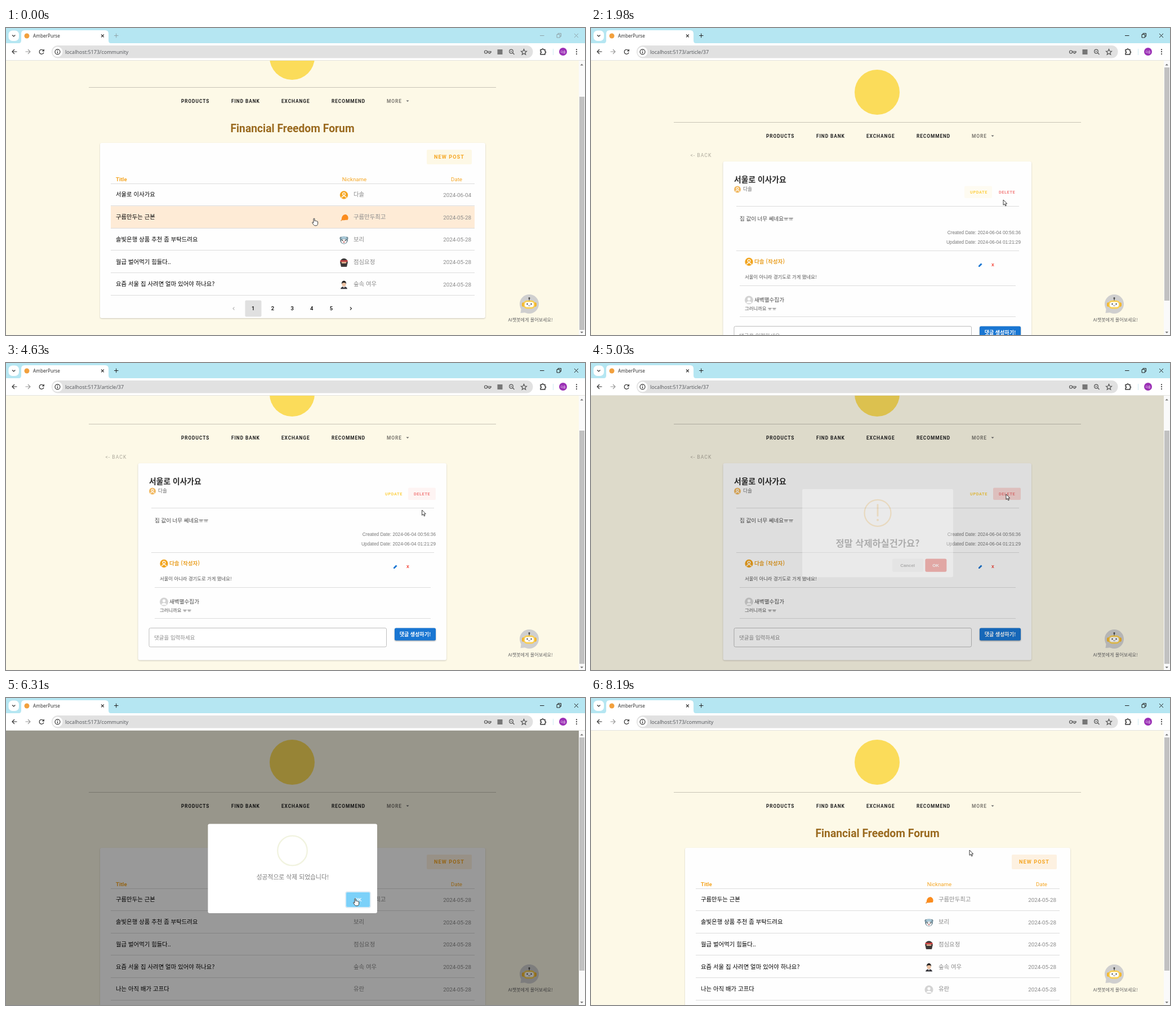
These frames come from a looping animation (1028x545 px, 8.87 s). An HTML page:

```html
<!DOCTYPE html>
<html lang="ko">
<head>
<meta charset="utf-8">
<title>Community board</title>
<style>
html, body { margin: 0; width: 100%; height: 100%; overflow: hidden; background: #fdf9e7; }
svg { display: block; }
/* every label is placed by its vertical centre */
text { font: 10.4px "Noto Sans CJK KR", sans-serif; transform: translateY(.36em); white-space: pre; }
.ro { font-family: Roboto, sans-serif; }
.ui { font-family: "Noto Sans", sans-serif; font-size: 9px; fill: #5a5d61; }
.b { font-weight: 700; }
.mid { text-anchor: middle; }
.end { text-anchor: end; }
.nav { font-size: 8.4px; font-weight: 600; letter-spacing: .9px; fill: #222; }
.gold { fill: #f5a623; }
.grey { fill: #8a8a8a; }
.small { font-size: 8.4px; fill: #555; }
.date { font: 8.25px "Liberation Sans", sans-serif; fill: #777; }
.act { font-size: 7.3px; font-weight: 700; letter-spacing: .6px; }
.btn { font: 700 8.8px "Liberation Sans", sans-serif; fill: #fff; text-anchor: middle; }
.line { stroke: #dcdcdc; }
.icon { fill: none; stroke: #333; stroke-width: 1.2; }
.card { fill: #fefefe; filter: drop-shadow(0 1px 1px #0003); }

/* one shared 8.87 s clock; 1% = 88.7 ms */
.t { animation: 8.87s step-end infinite; }
#listA { --post: #fdf8e6; translate: 0 -62px; animation-name: early; }
#listB { --post: #fdf1e1; animation-name: late; }
#article { animation-name: article, scroll; }
#faces { animation-name: faces; }
#hover { animation-name: hover; }
#glance { animation-name: glance; }
#press { animation-name: press; }
#boardUrl { animation-name: board; }
#articleUrl { animation-name: article; }
#winbtn { animation-name: focus; }
#thumb { animation-name: thumb; }
#dim { animation-name: dim; }
#modal { transform-origin: 509px 302px; animation-name: modal; }
#ask { animation-name: ask; }
#done { animation-name: late; }
#tick { stroke-dasharray: 1 2; animation-name: tick; }
#cursor { animation-name: cursor; }
#hand { animation-name: hand; }
#arrow { animation-name: arrow; }

@keyframes early { 0% { visibility: visible } 13.52%, 100% { visibility: hidden } }
@keyframes late { 0% { visibility: hidden } 70%, 100% { visibility: visible } }
@keyframes board { 0%, 70%, 100% { visibility: visible } 13.52% { visibility: hidden } }
@keyframes article { 0%, 70%, 100% { visibility: hidden } 13.52% { visibility: visible } }
@keyframes ask { 0%, 70%, 100% { visibility: hidden } 55.58% { visibility: visible } }
@keyframes faces { 0% { visibility: hidden } 73.39%, 100% { visibility: visible } }
@keyframes focus { 0% { stroke: #8fa3a8 } 13.52%, 100% { stroke: #222 } }
@keyframes hover { 0% { translate: 0 39.8px } 6.76%, 100% { translate: 0 0 } }
@keyframes glance { 0%, 27.95%, 100% { fill-opacity: 0 } 20.06% { fill-opacity: .06 } }
@keyframes press { 0% { fill-opacity: 0 } 23.44% { fill-opacity: .05 } 55.58%, 100% { fill-opacity: .19 } }
@keyframes scroll {
  0%, 27.95% { translate: 0 0; animation-timing-function: steps(8, start) }
  36.84%, 100% { translate: 0 -59px }
}
@keyframes thumb {
  0% { translate: 0 122px }
  13.52% { translate: 0 70px }
  27.95% { translate: 0 70px; animation-timing-function: steps(8, start) }
  36.84% { translate: 0 120px }
  70%, 100% { translate: 0 70px }
}
@keyframes dim {
  0% { opacity: 0 }
  55.58% { opacity: .04 }
  56.7% { opacity: .127 }
  57.83% { opacity: .29 }
  58.96% { opacity: .4 }
  82.41% { opacity: .27 }
  83.53% { opacity: .127 }
  84.66% { opacity: .03 }
  85.79%, 100% { opacity: 0 }
}
@keyframes modal {
  0% { opacity: 0; scale: .5 }
  55.58% { opacity: .06; scale: .6 }
  56.7% { opacity: .37; scale: .893 }
  57.83% { opacity: .85; scale: 1.03 }
  58.96% { opacity: 1; scale: 1 }
  82.41% { opacity: .5; scale: 1 }
  83.53% { opacity: .06; scale: .96 }
  84.66%, 100% { opacity: 0; scale: .9 }
}
@keyframes tick {
  0%, 83.53%, 100% { stroke-dashoffset: 1.01 }
  74.52% { stroke-dashoffset: 1.01; animation-timing-function: steps(6, start) }
  81.28% { stroke-dashoffset: 0 }
}
@keyframes cursor {
  0% { translate: 547px 338px }
  4.5% { translate: 547px 338px; animation-timing-function: steps(4, start) }
  9.01% { translate: 437px 297px }
  10.14% { translate: 437px 297px; animation-timing-function: steps(2, start) }
  12.4% { translate: 382px 293px }
  13.52% { translate: 382px 293px; animation-timing-function: steps(7, start) }
  21.15% { translate: 682px 306px }
  22.32% { translate: 732px 305px }
  23.44% { translate: 732px 305px; animation-timing-function: steps(3, start) }
  26.83% { translate: 748px 284px }
  27.95% { translate: 748px 284px; animation-timing-function: steps(8, start) }
  36.84% { translate: 743px 232px }
  44.75% { translate: 743px 232px; animation-timing-function: steps(4, start) }
  49.04% { translate: 735px 303px; animation-timing-function: steps(5, start) }
  54.39% { translate: 741px 233px }
  55.58% { translate: 737px 233px }
  58.96% { translate: 737px 233px; animation-timing-function: steps(6, start) }
  65.61% { translate: 622px 361px }
  68.88% { translate: 620px 356px }
  73.39% { translate: 620px 356px; animation-timing-function: steps(5, start) }
  79.02% { translate: 616px 353px }
  88.04% { translate: 616px 353px; animation-timing-function: steps(5, start) }
  93.4%, 100% { translate: 672px 270px }
}
@keyframes hand {
  0%, 23.44%, 53.32%, 64.48% { visibility: visible }
  13.52%, 44.75%, 55.58%, 88.04%, 100% { visibility: hidden }
}
@keyframes arrow {
  0%, 23.44%, 53.32%, 64.48% { visibility: hidden }
  13.52%, 44.75%, 55.58%, 88.04%, 100% { visibility: visible }
}
</style>
</head>
<body>
<svg width="1028" height="545" viewBox="0 0 1028 545">
<defs>
  <g id="person">
    <circle r="7.2" fill="currentColor"/>
    <circle cy="-1.8" r="2.3" fill="none" stroke="#fff" stroke-width="1.3"/>
    <path d="M-4 5C-3.4 .8 3.4 .8 4 5" fill="none" stroke="#fff" stroke-width="1.3"/>
  </g>
  <g id="blank">
    <circle r="7.5" fill="#d3d3d3"/>
    <circle cy="-1.8" r="2.6" fill="#fff"/>
    <path d="M-4.8 5.4C-4 .8 4 .8 4.8 5.4Z" fill="#fff"/>
  </g>
  <g id="nugget">
    <path d="M-3 3.5L-5.5 6" stroke="#e9a35e" stroke-width="1.8"/>
    <path d="M-4 4.5C-5-2 0-6.5 4-5C8-3 8.5 2 6.5 4.5C3 4-1 6-4 4.5Z" fill="#fb8c1e"/>
  </g>
  <g id="bear">
    <circle cx="-5" cy="-3" r="2.6" fill="#78909c"/><circle cx="5" cy="-3" r="2.6" fill="#78909c"/>
    <circle r="6.8" cy=".5" fill="#607d8b"/>
    <ellipse cy="2.5" rx="5" ry="4" fill="#f4f4f4"/>
    <path d="M-6-1.5C-4-8 4-8 6-1.5Z" fill="#a9c9d8"/>
    <circle cx="-2.5" cy="1" r=".9"/><circle cx="2.5" cy="1" r=".9"/>
    <ellipse cy="4" rx="1.5" ry="1.1" fill="#c66"/>
  </g>
  <g id="ninja">
    <path d="M-5 8L-6 4H6L5 8Z" fill="#464040"/>
    <circle r="6.8" fill="#3a3636"/>
    <rect x="-6.5" y="-3.5" width="13" height="2.4" fill="#d84343"/>
    <rect x="-4.5" y="-.8" width="9" height="2.8" rx="1.4" fill="#d9a98a"/>
  </g>
  <g id="man">
    <path d="M-6 7.5C-5 2 5 2 6 7.5Z" fill="#37373d"/>
    <ellipse cy="-1" rx="3.5" ry="4.3" fill="#eec3a4"/>
    <path d="M-4-1C-5-9 5-9 4-1L2.8-3.5H-2.5Z" fill="#222"/>
    <path d="M-1.5 3L0 6L1.5 3Z" fill="#fff"/>
  </g>

  <g id="head">
    <circle cx="508" cy="114" r="40" fill="#fbdc5a"/>
    <path d="M147 167.5H870" stroke="#c8c4b6"/>
    <text class="ro nav" x="311" y="192">PRODUCTS</text>
    <text class="ro nav" x="400" y="192">FIND BANK</text>
    <text class="ro nav" x="489" y="192">EXCHANGE</text>
    <text class="ro nav" x="578" y="192">RECOMMEND</text>
    <text class="ro nav" x="676" y="192" style="fill:#7d7a72">MORE</text>
    <path d="M710.5 190.5H715.5L713 193Z" fill="#666"/>
  </g>

  <g id="board">
    <use href="#head"/>
    <text class="ro b mid" x="508.5" y="240" style="font-size:19.3px" fill="#9a6a1f">Financial Freedom Forum</text>
    <rect class="card" x="167" y="266" width="684" height="311" rx="3"/>
    <rect x="747" y="278" width="80" height="26" rx="2" fill="var(--post)"/>
    <text class="ro b gold" x="760" y="291" style="font-size:9.2px;letter-spacing:1.05px">NEW POST</text>
    <g id="pages"></g>
    <text class="ro b gold" x="195" y="330.5" style="font-size:9.7px">Title</text>
    <text class="ro gold mid" x="618.5" y="330.5" style="font-size:9.7px">Nickname</text>
    <text class="ro gold mid" x="800" y="330.5" style="font-size:9.7px">Date</text>
  </g>
</defs>

<rect width="1028" height="545" fill="#fdf9e7"/>

<g id="listA" class="t">
  <use href="#board"/>
  <rect id="hover" class="t" x="186" y="338.5" width="646" height="39.8" fill="#feebd6"/>
  <g id="rowsA"></g>
</g>

<g id="listB" class="t">
  <use href="#board"/>
  <g id="rowsB"></g>
  <g id="faces" class="t"></g>
</g>

<g id="article" class="t">
  <use href="#head"/>
  <text class="ro" x="176.5" y="226" style="font-size:8.6px;letter-spacing:1px" fill="#aca89b">&lt;- BACK</text>
  <rect class="card" x="234.5" y="237" width="547.5" height="349.5" rx="3"/>
  <text class="b" x="254" y="269" style="font-size:13.8px" fill="#2a2a2a">서울로 이사가요</text>
  <use href="#person" transform="translate(260 286.5) scale(.83)" color="#f1b860"/>
  <text x="270" y="286" style="font-size:8.7px" fill="#666">다솔</text>
  <rect id="glance" class="t" x="663" y="280.5" width="49" height="21.5" rx="2" fill="#fbc02d"/>
  <text class="ro act" x="673" y="291.5" fill="#fdd044">UPDATE</text>
  <rect id="press" class="t" x="714" y="280.5" width="49" height="21.5" rx="2" fill="#f44336"/>
  <text class="ro act" x="724" y="291.5" fill="#f28080">DELETE</text>
  <path class="line" d="M258 316.5H760M258 395.5H760M264 457.5H754M264 512.5H754"/>
  <text x="264" y="339" style="font-size:9.5px" fill="#444">집 값이 너무 쎄네요ㅠㅠ</text>
  <text class="date end" x="763" y="363.5">Created Date: 2024-06-04 00:56:36</text>
  <text class="date end" x="763" y="380.5">Updated Date: 2024-06-04 01:21:29</text>
  <use href="#person" x="280.5" y="415" color="#f2a51f"/>
  <text class="b" x="290" y="415" style="font-size:9.6px" fill="#eaa32b">다솔 (작성자)</text>
  <text class="small" x="273" y="442">서울이 아니라 경기도로 가게 됐네요!</text>
  <path d="M688 424V422L692.5 417.5L694.5 419.5L690 424Z" fill="#1976d2"/>
  <text class="ro b mid" x="713.5" y="420.5" style="font-size:7.5px" fill="#f44336">X</text>
  <use href="#blank" x="280.5" y="483"/>
  <text x="290" y="483" style="font-size:9.6px" fill="#444">새벽별수집가</text>
  <text class="small" x="273" y="497.5">그러니까요 ㅠㅠ</text>
  <rect x="254" y="529.5" width="421.5" height="33.5" rx="2.5" fill="#fff" stroke="#bdbdbd"/>
  <text x="263" y="547" style="font-size:9.5px" fill="#8c8c8c">댓글을 입력하세요</text>
  <rect x="690" y="529.5" width="73" height="22" rx="2.5" fill="#1976d2" style="filter:drop-shadow(0 1px 1px #0006)"/>
  <text class="b mid" x="726.5" y="540.5" style="font-size:9px" fill="#fff">댓글 생성하기!</text>
</g>

<g id="chat">
  <path d="M915 496L913.5 506L924 505Z" fill="#cfcfcf"/>
  <circle cx="929" cy="490" r="17" fill="#cfcfcf"/>
  <path d="M929 484V480" stroke="#555" stroke-width="1.5"/><circle cx="929" cy="479.5" r="1.5" fill="#444"/>
  <rect x="916" y="487" width="26" height="8" rx="3" fill="#f3b62c"/>
  <rect x="919" y="483.5" width="20" height="15" rx="6" fill="#f9cf55"/>
  <rect x="921" y="486.5" width="16" height="9" rx="4" fill="#fff"/>
  <circle cx="925.5" cy="490" r="1.2" fill="#444"/><circle cx="932.5" cy="490" r="1.2" fill="#444"/>
  <path d="M927 492.5Q929 494 931 492.5" fill="none" stroke="#666" stroke-width=".8"/>
  <text class="mid" x="931" y="518.5" style="font-size:8.1px" fill="#666">AI챗봇에게 물어보세요!</text>
</g>

<rect id="dim" class="t" y="58" width="1017" height="487"/>

<g id="modal" class="t">
  <g id="ask" class="t">
    <rect x="359" y="214.5" width="300" height="175" rx="3" fill="#fff"/>
    <g fill="#f8d08c">
      <circle cx="509" cy="262" r="26.3" fill="none" stroke="#f8d08c" stroke-width="2.5"/>
      <rect x="507.4" y="244" width="3.2" height="25" rx="1.5"/><circle cx="509" cy="276" r="2.3"/>
    </g>
    <text class="b mid" x="509" y="322" style="font-size:18.4px" fill="#000" fill-opacity=".65">정말 삭제하실건가요?</text>
    <rect x="538" y="353" width="62" height="26" rx="3" fill="#efefef"/>
    <text class="btn" x="568.5" y="366" style="fill:#555">Cancel</text>
    <rect x="603.5" y="353" width="42.5" height="26" rx="3" fill="#e64942"/>
    <text class="btn" x="624.5" y="366">OK</text>
  </g>
  <g id="done" class="t">
    <rect x="358.5" y="223.5" width="300.5" height="158.5" rx="3" fill="#fff"/>
    <circle cx="508.5" cy="271" r="26.3" fill="none" stroke="#f1f3df" stroke-width="2.3"/>
    <path id="tick" class="t" pathLength="1" d="M493.5 271L505.5 283L525.5 260" fill="none" stroke="#a5dc86" stroke-width="3"/>
    <text class="mid" x="509" y="318" style="font-size:10.8px" fill="#7d7d7d">성공적으로 삭제 되었습니다!</text>
    <rect x="602.5" y="343.5" width="45" height="29" rx="4" fill="#c2d6e4"/>
    <rect x="603.5" y="344.5" width="43" height="27" rx="3" fill="#7cd1f9" stroke="#fff" stroke-width=".7"/>
    <text class="btn" x="625" y="358">OK</text>
  </g>
</g>

<g id="scrollbar">
  <rect x="1017" y="58" width="11" height="487" fill="#fafafa"/>
  <rect id="thumb" class="t" x="1018" width="9" height="414" fill="#c1c1c1"/>
  <path d="M1019.5 66.5H1025L1022.3 63.5ZM1019.5 539H1025L1022.3 542Z" fill="#777"/>
</g>

<g id="browser">
  <rect width="1028" height="27" fill="#b5e6f2"/>
  <rect x="4.5" y="4.5" width="18.5" height="18.5" rx="7" fill="#fff"/>
  <path class="icon" d="M11 12.5L13.7 15L16.4 12.5"/>
  <path d="M23 27Q27 27 27 22V10Q27 4 33 4H176Q182 4 182 10V22Q182 27 186 27Z" fill="#fff"/>
  <circle cx="37" cy="14" r="4.5" fill="#f2a03d"/>
  <text class="ui" x="48" y="14.5" style="font-size:8.2px;fill:#333">AmberPurse</text>
  <path class="icon" d="M169 11.5L173.8 16.3M173.8 11.5L169 16.3"/>
  <path id="winbtn" class="t" fill="none" d="M192 13.5H199.5M195.7 9.7V17.3M948 13.5H955.5M978 11.5H983.5V17H978ZM980 11V9.5H985.5V15H984M1009 10L1016 17M1016 10L1009 17"/>
  <rect y="27" width="1028" height="31" fill="#fff"/>
  <path d="M0 57.5H1028" stroke="#e3e3df"/>
  <path class="icon" d="M19.5 42H11M15 38L11 42L15 46"/>
  <path class="icon" style="stroke:#9a9a9a" d="M34.5 42H43M39 38L43 42L39 46"/>
  <path class="icon" d="M66.5 40A4 4 0 1 0 67 43.5M67.3 37.8V40.8H64.3"/>
  <rect x="81" y="31" width="854.5" height="22.5" rx="11.2" fill="#e1e1e1"/>
  <circle cx="91.5" cy="42.3" r="9" fill="#fff"/>
  <circle class="icon" cx="91.5" cy="42.3" r="4.5"/>
  <path class="icon" d="M91.5 41.8V45M91.5 39.5V40.7"/>
  <text id="boardUrl" class="ui t" x="105" y="42.5">localhost:5173/community</text>
  <text id="articleUrl" class="ui t" x="105" y="42.5">localhost:5173/article/37</text>
  <g class="icon" style="stroke:#555">
    <circle cx="852" cy="42.5" r="2.5"/><path d="M854.5 41.5H861V43.5H859.5V45H857.5V43.5H854.5"/>
    <circle cx="897" cy="41.5" r="3.3"/><path d="M899.5 44L902.5 47M895.5 41.5H898.5"/>
    <path d="M919.5 37.5L921 41L924.5 41.3L921.8 43.7L922.7 47.3L919.5 45.3L916.3 47.3L917.2 43.7L914.5 41.3L918 41Z"/>
  </g>
  <rect x="872.5" y="38" width="9" height="9" fill="#777"/>
  <path class="icon" style="stroke-width:1.4" d="M949 38.5H951.5A1.5 1.5 0 0 1 954.5 38.5H957V41.5A1.5 1.5 0 0 1 957 44.5V47H949V44.5A1.5 1.5 0 0 0 949 41.5Z"/>
  <path d="M971.5 37V48" stroke="#cdeaf2"/>
  <circle cx="989" cy="42" r="7" fill="#9b30b5"/>
  <text class="mid" x="989" y="42" style="font-size:5px" fill="#fff">다솔</text>
  <g fill="#333"><circle cx="1013" cy="38.3" r="1.1"/><circle cx="1013" cy="42.2" r="1.1"/><circle cx="1013" cy="46.1" r="1.1"/></g>
</g>

<g id="cursor" class="t" fill="#fff" stroke="#222" stroke-width=".9" stroke-linejoin="round">
  <path id="arrow" class="t" d="M0 0V9.3L2.2 7.4L3.8 10.9L5.3 10.2L3.8 6.9H6.7Z"/>
  <path id="hand" class="t" d="M-1 .9C-1-.3 1-.3 1 .9V4.5C1.2 3.8 2.8 3.8 3 4.9C3.4 4.2 4.9 4.4 5 5.4C5.5 4.9 6.6 5.2 6.6 6.2V9.2C6.6 11 5.6 12.8 3.6 12.8H1.6C.2 12.8-.6 11.8-1.3 10.7L-3.2 7.8C-3.6 7-2.6 6.2-1.9 6.9L-1 7.8Z"/>
</g>
</svg>

<script>
const TOP = 338.5, PITCH = 39.8;
const posts = [
  ['서울로 이사가요', '다솔', 'person', '2024-06-04'],
  ['구름만두는 근본', '구름만두최고', 'nugget'],
  ['솔빛은행 상품 추천 좀 부탁드려요', '보리', 'bear'],
  ['월급 벌어먹기 힘들다..', '점심요정', 'ninja'],
  ['요즘 서울 집 사려면 얼마 있어야 하나요?', '숲속 여우', 'man'],
  ['나는 아직 배가 고프다', '유란', 'blank']
];
const fill = (id, html) => document.getElementById(id).innerHTML = html;

const row = ([title, name, , date = '2024-05-28'], i) => {
  const y = TOP + PITCH * i + 19;
  return `<path class="line" d="M186 ${Math.round(y + 20.3) - .5}H832"/>
    <text x="195" y="${y}">${title}</text>
    <text class="grey" x="617" y="${y}">${name}</text>
    <text class="ro grey end" x="826" y="${y + .7}" style="font-size:9.9px">${date}</text>`;
};
const face = ([, , icon], i) =>
  `<use href="#${icon}" x="600" y="${TOP + PITCH * i + 20}" color="#f5a623"/>`;
const rule = `<path class="line" d="M186 ${TOP}H832"/>`;

const first = posts.slice(0, 5), second = posts.slice(1);
fill('rowsA', rule + first.map(row).join('') + first.map(face).join(''));
fill('rowsB', rule + second.map(row).join(''));
fill('faces', second.map(face).join(''));

const page = n => `<text class="ro mid" x="${404 + 34.7 * n}" y="560" style="font-size:9.5px;font-weight:500">${n}</text>`;
fill('pages', `<rect x="424.5" y="545.5" width="29" height="29" rx="2" fill="#e0e0e0"/>
  <path class="icon" style="stroke:#bbb" d="M405.5 557.5L403 560L405.5 562.5"/>
  <path class="icon" d="M611 557.5L613.5 560L611 562.5"/>` + [1, 2, 3, 4, 5].map(page).join(''));
</script>
</body>
</html>
```
